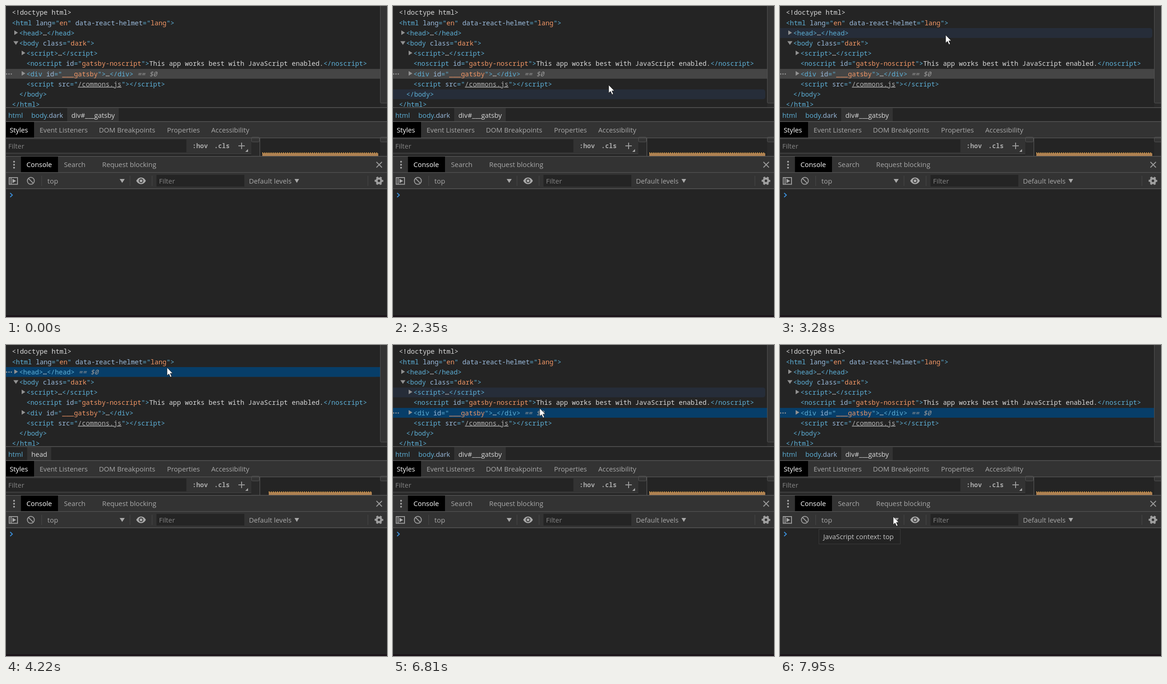
Recreate the animation shown at these times as an HTML page. Size 828 by 676 pixels, loop 8 s.

```html
<!DOCTYPE html>
<html lang="en">
<head>
<meta charset="utf-8">
<title>Element tree and console</title>
<style>
  html, body { margin: 0; width: 828px; height: 676px; overflow: hidden; background: #242424; }
  svg { display: block; font: 14.8px "Open Sans", "Noto Sans", sans-serif; fill: #a9a9a9; }
  .mono { font: 14.35px "Noto Sans Mono", "DejaVu Sans Mono", monospace; white-space: pre; }
  .bold { font-weight: 700; font-size: 14px; }
  .b { fill: #5db0d7; }
  .a { fill: #9bbbdc; }
  .v { fill: #f29766; }
  .t { fill: #d9d9d9; }
  .l { fill: #b4b4b4; text-decoration: underline; }
  .hint { fill: #999; font-style: italic; visibility: hidden; }
  .on { fill: #fff; }
  .dim { fill: #858585; }
  .tab { fill: #000; }
  .bar { fill: #333; }
  .field { fill: #242424; }
  .rule { fill: #575757; }
  .sep { stroke: #484848; }
  .thumb { fill: #333; stroke: #525252; }
  .icon { fill: none; stroke: #9a9a9a; stroke-width: 2; }
</style>
</head>
<body>
<svg width="828" height="676" viewBox="0 0 828 676">
  <rect width="828" height="676" fill="#242424"/>
  <rect id="hover" x="-8" width="817" height="21.4" rx="5" fill="#262d39"/>
  <rect id="select" width="813" height="21.2"/>
  <g id="dots" fill="#999"><circle cx="1.5" cy="11" r="1.4"/><circle cx="6.5" cy="11" r="1.4"/><circle cx="11.5" cy="11" r="1.4"/></g>
  <g id="tree" class="mono"></g>
  <path fill="#919191" d="M18 53v10l8-5zM16 76.500h11l-5.500 8zM34 97v10l8-5zM34 141.500v10l8-5z"/>
  <rect x="813" width="15" height="220" fill="#292929"/>
  <rect class="thumb" x="813.500" y="-3" width="16" height="214" rx="2"/>

  <!-- breadcrumbs -->
  <rect y="220" width="828" height="32" fill="#242424"/>
  <rect class="rule" y="220" width="828" height="1.500"/>
  <rect id="crumbBox" class="bar" y="222" height="29"/>
  <text class="b" x="5" y="242.500">html</text>
  <text id="parent" class="b" x="55" y="242.500">body<tspan class="a">.dark</tspan></text>
  <text id="crumb" class="t" y="242.500"></text>

  <!-- styles pane -->
  <rect class="bar" y="252" width="828" height="35"/>
  <rect class="tab" width="61" height="34" y="252"/>
  <text class="on" x="8" y="274.500">Styles</text>
  <text x="73" y="274.500">Event Listeners</text>
  <text x="202" y="274.500">DOM Breakpoints</text>
  <text x="350" y="274.500">Properties</text>
  <text x="446" y="274.500">Accessibility</text>
  <rect class="rule" y="250.500" width="828" height="1.500"/>
  <rect class="bar" y="287" width="533" height="39"/>
  <rect id="filter" class="field" x="-2" y="290" width="394" height="28"/>
  <rect y="321" width="533" height="5" fill="#242424"/>
  <rect y="321" width="533" height="1" fill="#484848"/>
  <text class="dim" x="5" y="310">Filter</text>
  <text class="mono bold" x="405" y="309">:hov</text>
  <text class="mono bold" x="452.500" y="309">.cls</text>
  <path class="icon" d="M505 304h14M512 297v14"/>
  <path d="M526 311v6h-6z"/>
  <rect x="533" y="287" width="18" height="39" fill="#292929"/>
  <rect class="thumb" x="533.500" y="285" width="17" height="10.500" rx="2"/>
  <rect class="rule" x="551" y="287" width="1.500" height="39"/>
  <rect x="552.500" y="287" width="260.500" height="39" fill="#242424"/>
  <rect x="813" y="287" width="15" height="39" fill="#292929"/>
  <rect class="thumb" x="813.500" y="285" width="17" height="10.500" rx="2"/>
  <rect class="rule" y="286" width="828" height="1.300"/>
  <path id="box" stroke="#ae8152" stroke-width="6"/>
  <path id="edge" stroke="#d9a050" stroke-width="2.500" stroke-dasharray="2 2.500"/>

  <!-- console drawer -->
  <rect class="bar" y="326" width="828" height="71"/>
  <rect class="rule" y="326" width="828" height="1.300"/>
  <rect class="tab" x="32.500" y="327.300" width="80.500" height="34"/>
  <circle cx="17.500" cy="338.500" r="1.900"/><circle cx="17.500" cy="345" r="1.900"/><circle cx="17.500" cy="351.500" r="1.900"/>
  <text class="on" x="44.500" y="350">Console</text>
  <text x="126" y="350">Search</text>
  <text x="209" y="350">Request blocking</text>
  <path class="icon" d="M805 339l12 12M817 339l-12 12"/>
  <rect class="rule" y="361.300" width="828" height="1.200"/>
  <rect class="rule" y="396.500" width="828" height="1.500"/>
  <path class="sep" d="M77.500 369v22M269.500 369v22M317.500 369v22M786.500 369v22"/>
  <path class="icon" d="M7 373h18v14.500H7zM11 373v14.500"/>
  <path d="M14 375.500v9.500l8-4.750z"/>
  <path class="icon" d="M48.500 374.500l11 11"/>
  <circle class="icon" cx="54" cy="380" r="7.600"/>
  <text x="90" y="385.500">top</text>
  <path d="M247 376h11l-5.500 8.500zM627 376h10l-5 8.500z"/>
  <path d="M283 380q4-7.300 10.500-7.300T304 380q-4 7.300-10.500 7.300T283 380"/>
  <circle cx="293.500" cy="380" r="4" stroke="#333" stroke-width="1.800"/>
  <rect class="field" x="327" y="367" width="191" height="25.500"/>
  <text class="dim" x="332.500" y="386">Filter</text>
  <text x="528" y="385.500">Default levels</text>
  <circle cx="810.500" cy="380" r="5" fill="none" stroke="#a0a0a0" stroke-width="4.500"/>
  <circle cx="810.500" cy="380" r="8" fill="none" stroke="#a0a0a0" stroke-width="2.800" stroke-dasharray="4.189" stroke-dashoffset="2.090"/>
  <path d="M9 406.500l4.800 4.500-4.800 4.500" fill="none" stroke="#3b8ed8" stroke-width="2"/>
  <rect y="672.500" width="828" height="4" fill="#1b1218"/>

  <g id="tip">
    <rect x="84.500" y="400.500" width="177" height="32" fill="#232323" stroke="#3b3b3b"/>
    <text x="94" y="422" fill="#c8c8c8">JavaScript context: top</text>
  </g>
  <path id="cursor" d="M0 0v17.500l4-3.700 3.200 7 2.800-1.300-3.100-6.800h5.400z" fill="#fff" stroke="#111" stroke-width=".8"/>
</svg>
<script>
const $ = id => document.getElementById(id);
const set = (el, attrs) => { for (const k in attrs) el.setAttribute(k, attrs[k]); };
const show = (el, on) => { el.style.visibility = on ? 'visible' : 'hidden'; };
const add = (parent, tag, attrs, text = '') => {
  const el = document.createElementNS('http://www.w3.org/2000/svg', tag);
  set(el, attrs);
  el.textContent = text;
  return parent.appendChild(el);
};

// Each part of a row starts with the letter of its colour class.
const rows = [
  [0, 't<!doctype html>'],
  [0, 'b<html|a lang|b="|ven|b"|a data-react-helmet|b="|vlang|b">'],
  [1, 'b<head>|t…|b</head>'],
  [1, 'b<body|a class|b="|vdark|b">'],
  [2, 'b<script>|t…|b<\/script>'],
  [2, 'b<noscript|a id|b="|vgatsby-noscript|b">|tThis app works best with JavaScript enabled.|b</noscript>'],
  [2, 'b<div|a id|b="|v___gatsby|b">|t…|b</div>'],
  [2, 'b<script|a src|b="|l/commons.js|b"><\/script>'],
  [1, 'b</body>'],
  [0, 'b</html>'],
];
const rowTop = i => 3.6 + 22.2 * i;
const hints = rows.map(([depth, parts], i) => {
  const line = add($('tree'), 'text', { x: 13 + 15.7 * depth, y: rowTop(i) + 15.7 });
  for (const part of parts.split('|')) add(line, 'tspan', { class: part[0] }, part.slice(1));
  return add(line, 'tspan', { class: 'hint' }, ' == $0');
});

// time, selected row, breadcrumb, its x
const selections = [
  [0, 6, 'div#___gatsby', 142],
  [4010, 2, 'head', 55],
  [4930, 3, 'body.dark', 55],
  [5340, 4, 'script', 142],
  [5710, 5, 'noscript', 142],
  [6170, 6, 'div#___gatsby', 142],
];
// time, x, y
const path = [
  [790, 807, 470], [1110, 697, 387], [1470, 697, 387], [2110, 482, 196],
  [2320, 482, 196], [2350, 469, 172], [2700, 400, 72], [3100, 425, 182],
  [3150, 425, 182], [3230, 364, 68], [3280, 360, 63], [3710, 350, 49],
  [6700, 350, 49], [6810, 319, 137], [7000, 292, 218], [7350, 262, 297],
  [7660, 262, 297], [7950, 246, 373],
];
function cursorAt(t) {
  const i = path.findIndex(p => p[0] > t);
  if (i < 1) return path[i ? path.length - 1 : 0].slice(1);
  const [t0, x0, y0] = path[i - 1], [t1, x1, y1] = path[i];
  const k = (t - t0) / (t1 - t0);
  return [x0 + (x1 - x0) * k, y0 + (y1 - y0) * k];
}

function draw() {
  const t = performance.now() % 8000;
  const [, row, name, crumbX] = selections.findLast(s => s[0] <= t);
  set($('select'), { y: rowTop(row), fill: t < 4010 ? '#454545' : '#073e69' });
  set($('dots'), { transform: `translate(0 ${rowTop(row)})` });
  hints.forEach((hint, i) => show(hint, i === row));

  const crumb = $('crumb');
  crumb.textContent = name;
  set(crumb, { x: crumbX });
  set($('crumbBox'), { x: crumbX - 9, width: crumb.getComputedTextLength() + 17.5 });
  show($('parent'), crumbX > 55);

  const wide = t < 4220 || (t >= 5120 && t < 5410) || t >= 6300;
  const span = wide ? 'H809' : 'H795', left = wide ? 557 : 571;
  set($('box'), { d: `M${left} 323${span}` });
  set($('edge'), { d: `M${left} 319.5${span}` });

  const [x, y] = cursorAt(t);
  set($('cursor'), { transform: `translate(${x} ${y})` });
  show($('cursor'), t >= 790);

  // Hover follows the pointer slightly late and rests during keyboard use.
  const hoverY = cursorAt(t - 50)[1];
  const hovered = Math.floor((hoverY - 3.6) / 22.2);
  set($('hover'), { y: rowTop(hovered) });
  show($('hover'), t >= 1490 && hoverY < 220 && (t < 4930 || t > 6710));
  set($('filter'), { stroke: hoverY > 290 && hoverY < 318 && t > 6710 ? '#4c4c4c' : 'none' });
  show($('tip'), t >= 7950);
  requestAnimationFrame(draw);
}
draw();
</script>
</body>
</html>
```
